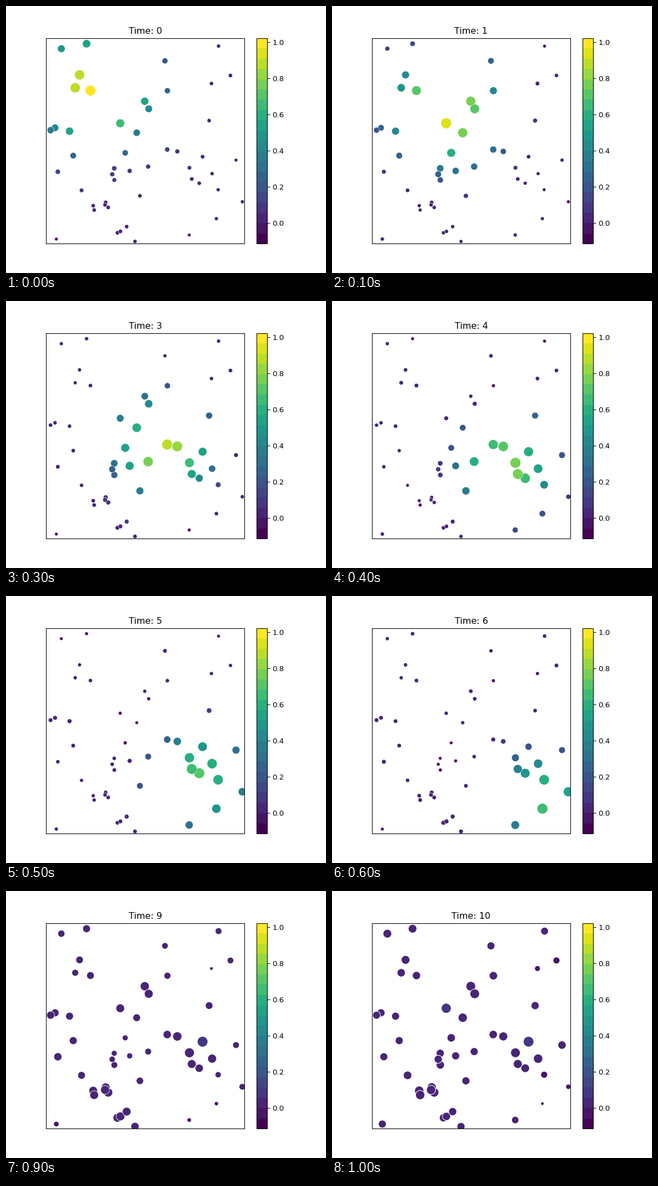
Animation, 576 px wide and 480 px high, one loop 1.1 s. Source, as a matplotlib script:

```python
import matplotlib.pyplot as plt
import numpy as np
from matplotlib.animation import FuncAnimation
from matplotlib.cm import ScalarMappable
from matplotlib.colors import Normalize

W, H, DPI = 576, 480, 96
STEPS = 11
LAST = STEPS - 1
SMALL, LARGE = 20, 200

# Sensor sites in stage pixels, in drawing order
SITES = np.array([
    (99.6, 76.7), (145, 67.8), (132.4, 123.8), (124.6, 147), (152, 152),
    (88.3, 219), (80.2, 223.2), (114.4, 225), (121, 269), (93.3, 298),
    (136, 331.4), (157, 359), (158.7, 366.8), (179.4, 353), (184, 362.2),
    (178.3, 357.5), (90.6, 419), (200.6, 407.7), (206, 405.2), (217.2, 396.6),
    (232.2, 423.3), (241, 341.3), (195, 312.8), (194.8, 291.8), (191.2, 302.5),
    (222.6, 296.4), (255.9, 288.7), (214.6, 264), (235.3, 227.8), (205.6, 210.8),
    (249.8, 171.2), (256.9, 184.8), (286.1, 98.6), (290.5, 152.3), (382.6, 72.1),
    (404, 124.9), (369.8, 139.4), (365.6, 206), (290.2, 258), (308.3, 261.4),
    (353.8, 270.9), (330.2, 290.8), (347.8, 318.6), (334.4, 311), (371, 301.4),
    (414, 277), (381.9, 330.3), (425.4, 351.9), (378.7, 382.3), (329.8, 411.7),
])
X, Y = SITES.T

# Faint hills and hollows (x, y, height) left once the plume has gone
HILLS = [(354, 271, 0.06), (204, 208, 0.04), (252, 176, 0.03), (125, 95, 0.025),
         (168, 362, 0.03), (379, 382, -0.055), (370, 140, -0.035), (425, 350, -0.03)]


def dist2(x, y):
    return (X - x) ** 2 + (Y - y) ** 2


def plume(t):
    """Decaying blob that slows toward the lower right, its rim sharpening."""
    u = dist2(163 + 42 * t - t**2, 150 + 39 * t - 0.5 * t**2) / (11400 - 300 * t)
    return 1.02 * np.exp(-0.07 * t - u - 0.05 * t * u**3)


def field(t):
    late = (t / LAST) ** 6
    ripple = 0.035 * np.sin(X / 40 + t) * np.cos(Y / 45 - t)
    relief = sum(h * np.exp(-dist2(x, y) / 2000) for x, y, h in HILLS)
    return 0.012 + (1 - late) * (plume(t) + ripple) + late * relief


def marker_sizes(values):
    low, high = values.min(), values.max()
    return SMALL + (LARGE - SMALL) * (values - low) / (high - low)


fig, ax = plt.subplots(figsize=(W / DPI, H / DPI), dpi=DPI)
cmap = plt.get_cmap("viridis", 20)
norm = Normalize(-0.114, 1.0215)
fig.colorbar(ScalarMappable(norm, cmap), ax=ax)

dots = ax.scatter(X, Y, c=field(0), cmap=cmap, norm=norm, edgecolors="white")
ax.set(xlim=(0.125 * W, 0.745 * W), ylim=(0.89 * H, 0.12 * H), xticks=[], yticks=[])
title = ax.set_title("")


def update(t):
    values = field(t)
    sizes = marker_sizes(values)
    dots.set_array(values)
    dots.set_sizes(sizes)
    dots.set_linewidths(0.08 * np.sqrt(np.percentile(sizes, 10)))
    title.set_text(f"Time: {t}")
    return dots, title


anim = FuncAnimation(fig, update, frames=STEPS, init_func=lambda: update(0),
                     interval=100, repeat=True)
plt.show()
```
